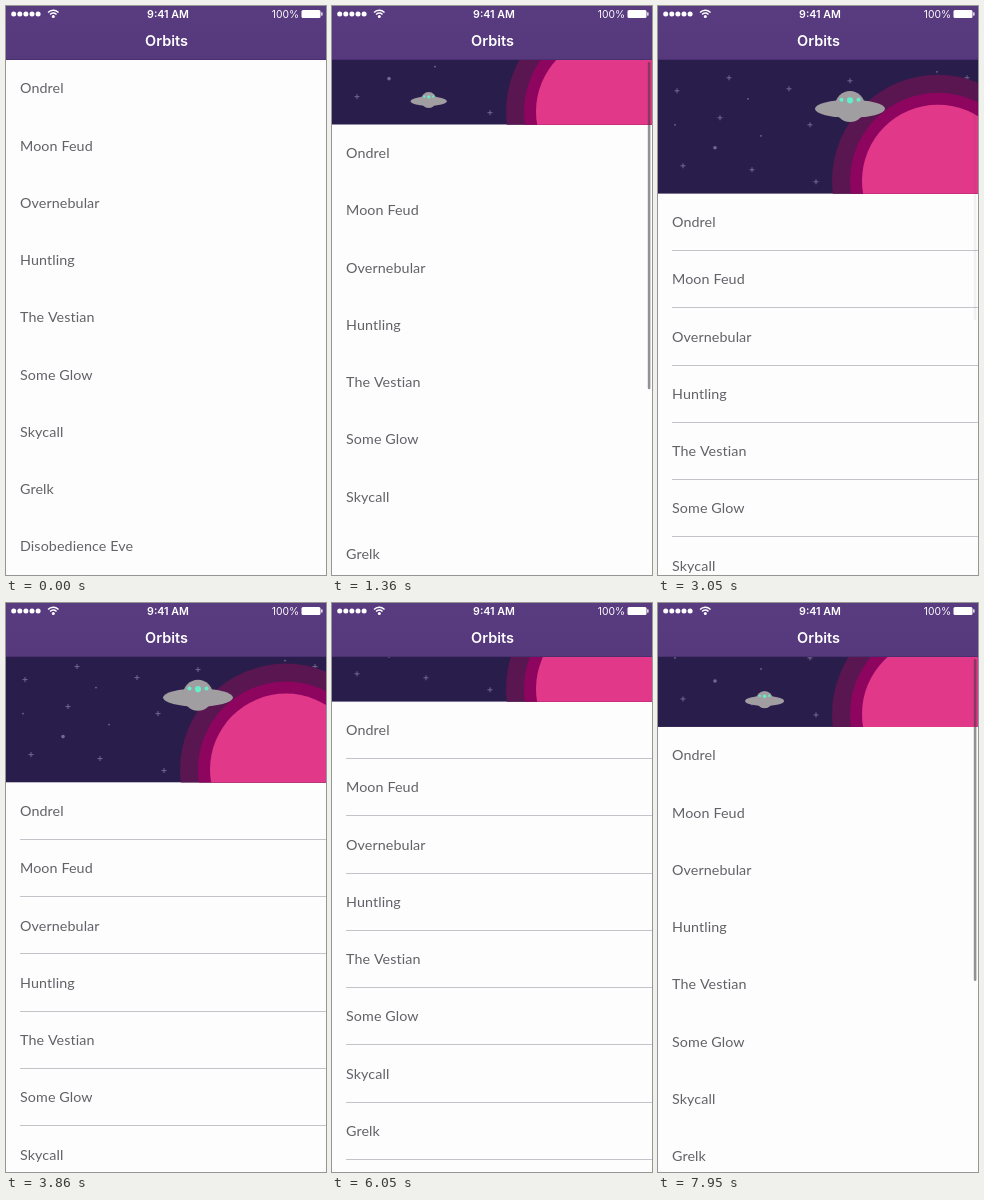
Recreate the animation shown at these times as an HTML page with a canvas. Size 320 by 569 pixels, loop 8000 ms.

```html
<!DOCTYPE html>
<html lang="en">
<head>
<meta charset="utf-8">
<title>Pull to refresh</title>
<style>
html, body { margin: 0; width: 100%; height: 100%; overflow: hidden; background: #fefdfe; }
canvas { display: block; width: 320px; height: 569px; }
</style>
</head>
<body>
<canvas id="stage"></canvas>
<script>
const W = 320, H = 569, LOOP = 8000;
const NAV = 54, ROW = 57.25, OPEN = 125.6;
const rows = ['Ondrel', 'Moon Feud', 'Overnebular', 'Huntling', 'The Vestian',
  'Some Glow', 'Skycall', 'Grelk', 'Disobedience Eve'];

// Header height over time
const pull = [[0, 0], [520, 0], [1360, 64.6], [2100, 104], [2800, 133], [3050, 133.8],
  [3400, 127], [3750, OPEN], [5550, OPEN], [5800, 102], [6050, 45], [6300, 0],
  [6500, 0], [7140, 75.8], [7550, 88], [7950, 70], [8000, 67]];

// Star positions, y measured from the header's bottom edge
const sparkles = [[19, -103], [71, -116], [131, -105], [192, -113], [62, -76],
  [152, -78], [25, -28], [94, -24], [158, -12], [309, -116]];
const dots = [[57, -46, 1.8], [17, -69, 0.9], [90, -104, 0.9], [130, -58, 0.9], [279, -130, 0.9]];
sparkles[5][1] = -69;
dots[2][1] = -95;
dots[3][0] = 103;
dots[4][1] = -122;

const canvas = document.getElementById('stage');
const ctx = canvas.getContext('2d');
const dpr = window.devicePixelRatio || 1;
canvas.width = W * dpr;
canvas.height = H * dpr;

const clamp = (v, a = 0, b = 1) => Math.min(b, Math.max(a, v));

function slope(keys, i) {
  if (i < 1 || i > keys.length - 2) return 0;
  const [a, b, c] = [keys[i - 1], keys[i], keys[i + 1]];
  const m = (b[1] - a[1]) / (b[0] - a[0]);
  const n = (c[1] - b[1]) / (c[0] - b[0]);
  return m * n > 0 ? 2 * m * n / (m + n) : 0;
}

// Monotone cubic interpolation
function sample(keys, t) {
  let i = 0;
  while (i < keys.length - 2 && t >= keys[i + 1][0]) i++;
  const [t0, a] = keys[i], [t1, b] = keys[i + 1];
  const d = t1 - t0, u = (t - t0) / d, v = 1 - u;
  return a * v * v * (1 + 2 * u) + b * u * u * (3 - 2 * u)
    + d * u * v * (v * slope(keys, i) - u * slope(keys, i + 1));
}

function rect(x, y, w, h, color) {
  ctx.fillStyle = color;
  ctx.fillRect(x, y, w, h);
}

function oval(x, y, rx, ry, color) {
  ctx.fillStyle = color;
  ctx.beginPath();
  ctx.ellipse(x, y, rx, ry, 0, 0, Math.PI * 2);
  ctx.fill();
}

const disc = (x, y, r, color) => oval(x, y, r, r, color);

function label(str, x, y, font, color, align = 'left', spacing = 0) {
  ctx.font = font;
  ctx.fillStyle = color;
  ctx.textAlign = align;
  ctx.letterSpacing = spacing + 'px';
  ctx.fillText(str, x, y);
}

function drawSky(bottom) {
  rect(0, NAV, W, bottom - NAV, '#291d4b');
  for (const [x, y] of sparkles) {
    rect(x - 2.5, bottom + y - 0.5, 5, 1, '#75688f');
    rect(x - 0.5, bottom + y - 2.5, 1, 5, '#75688f');
  }
  for (const [x, y, r] of dots) disc(x, bottom + y, r, '#75688f');
  const cx = 280, cy = bottom - 13;
  disc(cx, cy, 106, '#591650');
  disc(cx, cy, 88, '#8e0560');
  disc(cx, cy, 76, '#e2388a');
}

function drawSaucer(t, h, bottom) {
  if (t > 5800 && t < 6500) return;
  const p = t > 5450 && t < 5800 ? 1 : clamp(h / OPEN);
  const x = -48 + 324.7 * p - 84.7 * p * p;
  let y = bottom - (34.8 - 97.8 * p + 149 * p * p);
  if (t > 3940 && t < 5800) {
    y -= 60 * Math.sin(Math.PI * 2 * (Math.min(t, 5450) - 3940) / 1020);
    y -= 150 * clamp((t - 5450) / 300) ** 2;
  }
  ctx.save();
  ctx.translate(x, y);
  ctx.scale(p, p);
  oval(0, -1.3, 15, 15.5, '#a19ea1');
  oval(0, 1, 35, 9, '#a19ea1');
  disc(0, -7.5, 3.1, '#62efc9');
  disc(-8.5, -8, 2, '#62efc9');
  disc(8.5, -8, 2, '#62efc9');
  ctx.restore();
}

function drawHeader(t, h) {
  if (h < 0.1) return;
  const bottom = NAV + h;
  ctx.save();
  ctx.beginPath();
  ctx.rect(0, NAV, W, h);
  ctx.clip();
  drawSky(bottom);
  drawSaucer(t, h, bottom);
  ctx.restore();
}

function drawRows(t, h) {
  const lines = t > 2180 && t < 7500;
  rows.forEach((name, i) => {
    const top = NAV + h + ROW * i;
    label(name, 14, top + 33.4, '14.3px Lato, sans-serif', '#626166', 'left', 0.1);
    if (lines) rect(14, Math.round(top + ROW - 1), W - 14, 1, '#c5c3ca');
  });
}

function drawScrollbar(t, h) {
  const alpha = t < 5000
    ? clamp((t - 550) / 100) * clamp((3080 - t) / 250)
    : clamp((t - 6520) / 100);
  if (!alpha) return;
  ctx.fillStyle = `rgba(60,58,64,${0.55 * alpha})`;
  ctx.beginPath();
  ctx.roundRect(315.8, NAV + 2, 2.6, 392 - h, 1.3);
  ctx.fill();
}

function drawNav() {
  const shade = ctx.createLinearGradient(0, 0, 0, NAV);
  shade.addColorStop(0, '#593b80');
  shade.addColorStop(1, '#56387c');
  rect(0, 0, W, NAV, shade);
  rect(0, NAV - 0.6, W, 0.6, '#452c68');

  for (let i = 0; i < 5; i++) disc(7.7 + i * 6.1, 8, 2.5, '#fff');
  ctx.strokeStyle = '#fff';
  ctx.lineWidth = 1.5;
  for (const r of [4.4, 7.2]) {
    ctx.beginPath();
    ctx.arc(47.3, 11.5, r, -Math.PI * 0.76, -Math.PI * 0.24);
    ctx.stroke();
  }
  disc(47.3, 10.6, 1.5, '#fff');

  label('9:41 AM', 162, 11.8, '600 10.7px Inter, sans-serif', '#fff', 'center');
  label('100%', 293, 11.8, '10.3px Inter, sans-serif', '#fff', 'right');
  ctx.fillStyle = '#fff';
  ctx.beginPath();
  ctx.roundRect(295.5, 4, 19, 8, 1.5);
  ctx.fill();
  rect(315.2, 6.4, 1.3, 3.2, '#fff');

  label('Orbits', 160.5, 40, '600 14.5px Inter, sans-serif', '#fff', 'center');
}

function draw(t) {
  const h = sample(pull, t);
  ctx.setTransform(dpr, 0, 0, dpr, 0, 0);
  rect(0, 0, W, H, '#fefdfe');
  drawRows(t, h);
  drawHeader(t, h);
  drawScrollbar(t, h);
  drawNav();
}

const start = performance.now();
function tick() {
  draw((performance.now() - start) % LOOP);
  requestAnimationFrame(tick);
}
tick();
</script>
</body>
</html>
```
